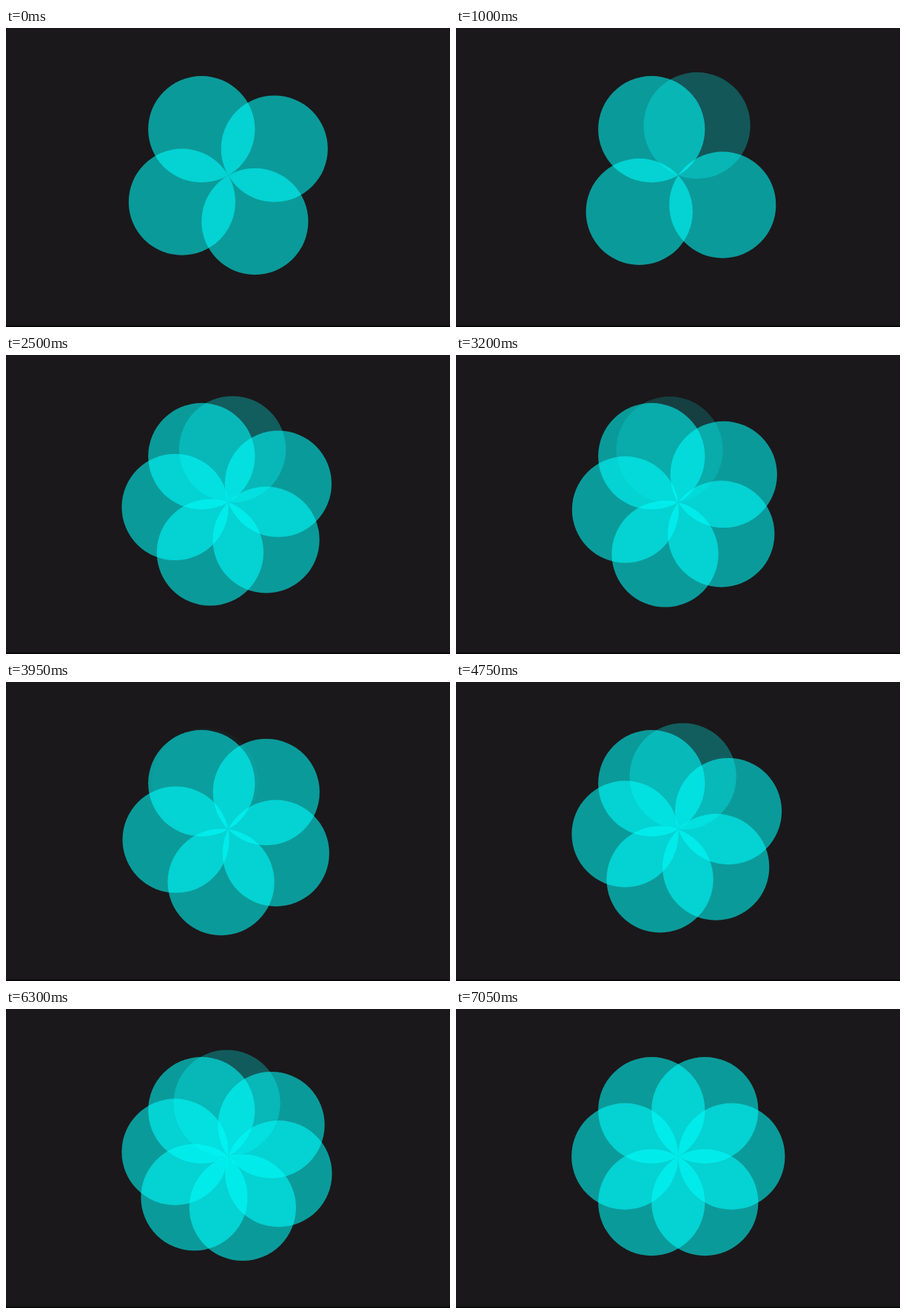
These frames come from a looping animation (600 px wide and 405 px high, 7.3 s). An HTML page with a canvas:

```html
<!DOCTYPE html>
<html lang="en">
<head>
<meta charset="utf-8">
<title>Petal circles</title>
<style>
  html, body { margin: 0; width: 100%; height: 100%; overflow: hidden; background: #1a181a; }
  canvas { display: block; }
</style>
</head>
<body>
<canvas id="stage" width="600" height="405"></canvas>
<script>
const LOOP = 7300, STEP = 50;
const CENTER = { x: 300.3, y: 199.6 }, RADIUS = 72.1, ALPHA = 0.56;
const START_ANGLE = -30;

const linear = u => u;
const smooth = u => u * u * (3 - 2 * u);

// The petal count glides from leg to leg; a fractional petal is partly transparent
const LEGS = [
  { start: 200, end: 745, to: 3, ease: smooth },
  { start: 745, end: 1700, to: 5.79, ease: smooth },
  { start: 1700, end: 4000, to: 5.045, ease: linear },
  { start: 4000, end: 6250, to: 6.53, ease: linear },
  { start: 6250, end: 6800, to: 6, ease: smooth }
];

function petalCount(time) {
  let count = 4;
  for (const { start, end, to, ease } of LEGS) {
    const u = Math.min(1, Math.max(0, (time - start) / (end - start)));
    count += (to - count) * ease(u);
  }
  return count;
}

const ctx = document.getElementById("stage").getContext("2d");

function drawPetal(degrees, opacity) {
  const angle = degrees * Math.PI / 180;
  ctx.globalAlpha = ALPHA * opacity;
  ctx.beginPath();
  ctx.arc(CENTER.x + RADIUS * Math.sin(angle), CENTER.y - RADIUS * Math.cos(angle), RADIUS, 0, 2 * Math.PI);
  ctx.fill();
}

function draw(time) {
  const count = petalCount(time);
  ctx.globalAlpha = 1;
  ctx.fillStyle = "#1a181a";
  ctx.fillRect(0, 0, 600, 405);
  ctx.fillStyle = "#0a090a";
  ctx.fillRect(0, 403, 600, 2);
  ctx.fillStyle = "#00ffff";
  for (let i = 0; i < count; i++) {
    drawPetal(START_ANGLE - i * 360 / count, Math.min(1, count - i));
  }
}

function tick() {
  const time = performance.now() % LOOP;
  draw(Math.floor(time / STEP) * STEP);
  requestAnimationFrame(tick);
}
tick();
</script>
</body>
</html>
```
